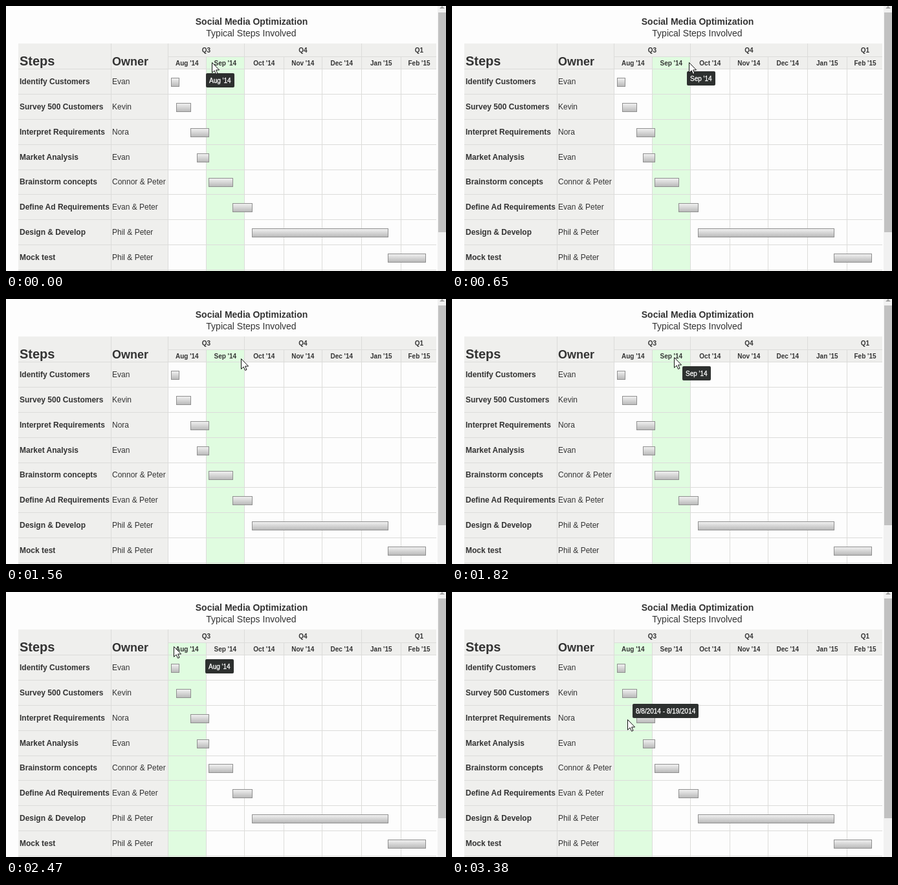
Write an HTML page that moves like this. It is 680 by 410 pixels and loops after 3510 ms.

```html
<!DOCTYPE html>
<html lang="en">
<head>
<meta charset="utf-8">
<title>Project schedule</title>
<style>
  html, body { margin: 0; width: 100%; height: 100%; overflow: hidden; background: #fdfdfd; }
  svg { display: block; width: 680px; height: 410px; }
  text { font-family: "Liberation Sans", Arial, sans-serif; font-size: 12px; fill: #333; }
  .bold { font-weight: bold; }
  .mid { text-anchor: middle; }
  .small { font-size: 10px; font-weight: bold; text-anchor: middle; }
  .title { font-size: 14px; }
  .line { fill: none; stroke: #dcdcda; shape-rendering: crispEdges; }
  .bar { fill: url(#metal); stroke: #8f8f8f; shape-rendering: crispEdges; }
  #tip text { font-size: 10px; fill: #fff; stroke: #fff; stroke-width: .3px; }
</style>
</head>
<body>
<svg viewBox="0 0 680 410">
  <defs>
    <linearGradient id="metal" x1="0" y1="0" x2="0" y2="1">
      <stop offset="0" stop-color="#f2f2f2"/>
      <stop offset="1" stop-color="#b8b8b8"/>
    </linearGradient>
  </defs>
  <rect width="680" height="410" fill="#fdfdfd"/>
  <text class="title bold mid" x="379.5" y="29">Social Media Optimization</text>
  <text class="title mid" x="379" y="47">Typical Steps Involved</text>
  <path d="M19 58H665V97H250V410H19Z" fill="#efefed"/>
  <rect id="glow" y="78" height="332" fill="#e0fce0"/>
  <g id="grid"></g>
  <text class="bold" x="21" y="92" style="font-size:20px">Steps</text>
  <text class="bold" x="164" y="92" style="font-size:18px">Owner</text>
  <g id="chart"></g>
  <rect x="667" width="13" height="410" fill="#f1f1f1"/>
  <rect x="668" y="10" width="12" height="340" fill="#c1c1c1"/>
  <path d="M670 4L674 0L678 4Z" fill="#a3a3a3"/>
  <g id="tip">
    <rect height="22" rx="2" fill="#2d302f"/>
    <text x="5" y="14.5"></text>
  </g>
  <path id="cursor" d="M.5 .5V16.3L4.1 12.9L6.6 18.4L9 17.4L6.6 12H11.6Z"
    fill="#fff" stroke="#111" stroke-linejoin="round"/>
</svg>
<script>
const $ = id => document.getElementById(id);

function add(parent, tag, attrs, label) {
  const el = document.createElementNS("http://www.w3.org/2000/svg", tag);
  for (const key in attrs) el.setAttribute(key, attrs[key]);
  if (label) el.textContent = label;
  $(parent).append(el);
}

const edges = [250, 309, 368, 429, 488, 549, 610, 665];
const months = ["Aug '14", "Sep '14", "Oct '14", "Nov '14", "Dec '14", "Jan '15", "Feb '15"];
const quarters = [["Q3", 309.5], ["Q4", 459], ["Q1", 638.5]];
const rows = [
  ["Identify Customers", "Evan", 255, 268],
  ["Survey 500 Customers", "Kevin", 263, 286],
  ["Interpret Requirements", "Nora", 285, 314],
  ["Market Analysis", "Evan", 295, 314],
  ["Brainstorm concepts", "Connor & Peter", 313, 351],
  ["Define Ad Requirements", "Evan & Peter", 350, 381],
  ["Design & Develop", "Phil & Peter", 380, 591],
  ["Mock test", "Phil & Peter", 590, 649]
];
const pitch = 38.85;

const line = d => add("grid", "path", { class: "line", d });
line("M250 78.5H665M19 97.5H665M162.5 58V410M250.5 58V410");
edges.slice(1, -1).forEach((x, i) => line(`M${x + .5} ${i % 3 == 1 ? 58 : 78}V410`));

months.forEach((name, i) => {
  const x = i == 6 ? 638.5 : (edges[i] + edges[i + 1]) / 2 + .3;
  add("chart", "text", { class: "small", x, y: 92 }, name);
});
quarters.forEach(([name, x]) => add("chart", "text", { class: "small", x, y: 72 }, name));

rows.forEach(([step, owner, from, to], i) => {
  const top = Math.round(i * pitch);
  line(`M19 ${top + 136.5}H665`);
  add("chart", "text", { class: "bold", x: 21, y: top + 121 }, step);
  add("chart", "text", { x: 164, y: top + 121 }, owner);
  add("chart", "rect", { class: "bar", x: from + .5, y: top + 111.5, width: to - from - 1, height: 13 });
});

// Tooltips: text, x, y, width
const tips = {
  augStart: [months[0], 309, 104, 44],
  sep: [months[1], 363, 101, 44],
  sepBack: [months[1], 356, 104, 44],
  aug: [months[0], 308, 104, 44],
  first: ["8/4/2014 - 8/10/2014", 277, 134, 102],
  second: ["8/8/2014 - 8/19/2014", 279, 173, 102]
};

// Pointer samples: time, x, y, lit month, tooltip
const poses = [
  [0, 318, 87, 1, "augStart"],
  [100, 333, 87, 1],
  [130, 345, 87, 1],
  [260, 350, 87, 1, "sep"],
  [520, 359, 88, 1, "sep"],
  [650, 366, 87, 1, "sep"],
  [780, 373, 86, 2, "sep"],
  [910, 378, 86, 2, "sep"],
  [1170, 381, 90, 2],
  [1560, 363, 92, 1],
  [1690, 350, 91, 1],
  [1820, 343, 90, 1, "sepBack"],
  [2080, 295, 90, 0, "aug"],
  [2210, 281, 88, 0, "aug"],
  [2340, 268, 86, 0, "aug"],
  [2470, 259, 84, 0, "aug"],
  [2730, 257, 87, 0, "aug"],
  [2860, 259, 92, 0, "aug"],
  [2990, 261, 98, 0],
  [3120, 264, 120, 0, "first"],
  [3250, 264, 151, 0, "first"],
  [3380, 271, 197, 0, "second"]
];
const loop = 3510;
const place = (el, x, y) => el.setAttribute("transform", `translate(${x} ${y})`);
const tipBox = $("tip").querySelector("rect");
const tipText = $("tip").querySelector("text");
let shown;

function show(pose) {
  const [, x, y, month, name] = pose;
  place($("cursor"), x, y);
  $("glow").setAttribute("x", edges[month]);
  $("glow").setAttribute("width", edges[month + 1] - edges[month]);
  $("tip").style.display = name ? "" : "none";
  if (!name) return;
  const [label, left, top, width] = tips[name];
  place($("tip"), left, top);
  tipBox.setAttribute("width", width);
  tipText.textContent = label;
}

const start = performance.now();
function tick(now) {
  const t = Math.max(0, now - start) % loop;
  const pose = poses.findLast(p => p[0] <= t);
  if (pose !== shown) show(shown = pose);
  requestAnimationFrame(tick);
}
tick(start);
</script>
</body>
</html>
```
